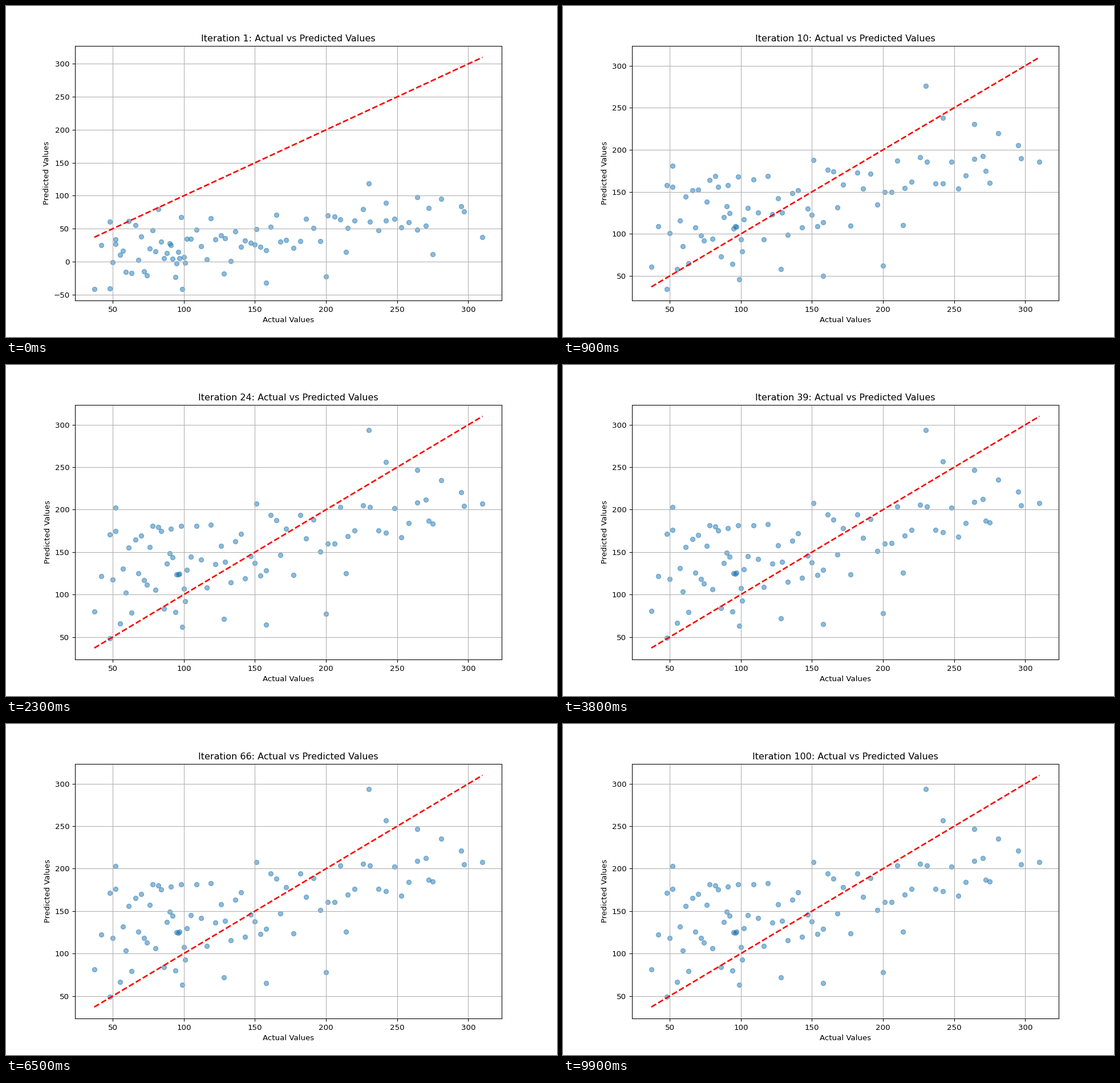
Animation, 966 px wide and 580 px high, one loop 10 s. Source, as a matplotlib script:

```python
import matplotlib.pyplot as plt
import numpy as np
from matplotlib.animation import FuncAnimation

W, H, DPI = 966, 580, 96
STEPS, INTERVAL = 100, 100

# Points that shape the cloud: actual value, first and settled prediction
OUTLINE = [
    (37, -41.5, 81), (42, 25, 122), (48, -40.6, 49), (52, 34, 203),
    (99, -41.4, 63), (128, -18, 72), (151, 49, 208), (158, -32, 65.5),
    (200, -22.5, 78), (214, 15, 126), (230, 119, 294), (242, 89, 257),
    (264, 98, 247), (272, 81, 187), (281, 95, 235), (295, 84, 221),
    (297, 76, 205), (310, 37, 208),
]
FILL = 71


def fill_cloud(n, rng):
    """Scatter n more points, denser at low values, inside a rising band."""
    x = np.interp(np.linspace(0, 7, n), range(8),
                  [48, 70, 90, 102, 136, 172, 220, 275]).round()
    low = np.interp(x, [48, 100, 140, 275], [55, 65, 100, 175])
    high = 170 + 0.17 * x
    settled = rng.uniform(low, high)
    start = np.clip(0.6 * settled - 60 + rng.normal(0, 15, n), -32, 80)
    return np.array([x, start, settled])


actual, first, final = np.hstack(
    [np.transpose(OUTLINE), fill_cloud(FILL, np.random.default_rng(4))])

# Errors shrink geometrically, faster for points that start high
decay = 0.807 - 0.00025 * first
ends = np.array([actual.min(), actual.max()])


def predict(step):
    return final - (final - first) * decay ** step


def padded(lo, hi):
    pad = 0.05 * (hi - lo)
    return lo - pad, hi + pad


fig, ax = plt.subplots(figsize=(W / DPI, H / DPI), dpi=DPI)
dots = ax.scatter(actual, first, alpha=0.5)
ax.plot(ends, ends, "r--", lw=2)
ax.set_xlabel("Actual Values")
ax.set_ylabel("Predicted Values")
ax.set_xlim(*padded(*ends))
ax.grid(True)


def update(step):
    y = predict(step)
    dots.set_offsets(np.column_stack([actual, y]))
    ax.set_ylim(*padded(min(y.min(), ends[0]), max(y.max(), ends[1])))
    ax.set_title(f"Iteration {step + 1}: Actual vs Predicted Values")
    return [dots]


anim = FuncAnimation(fig, update, frames=STEPS, interval=INTERVAL,
                     repeat=True, repeat_delay=0, blit=False)
plt.show()
```
